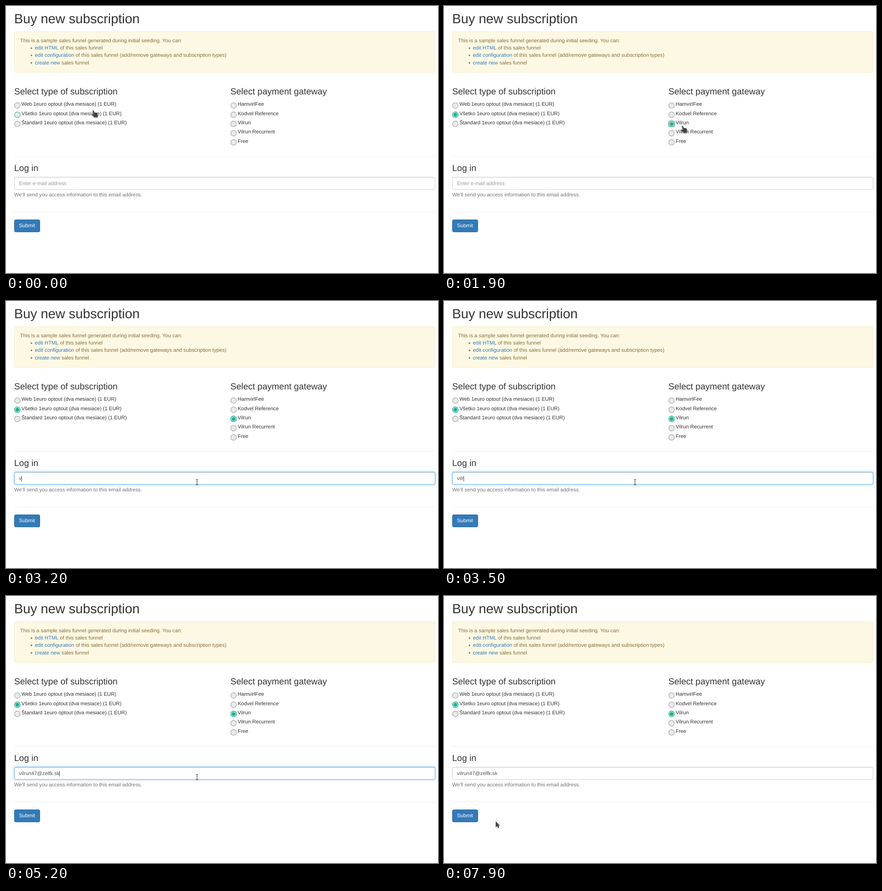
Recreate the animation shown at these times as an HTML page. Size 951x589 px, loop 8000 ms.

```html
<!DOCTYPE html>
<html lang="en">
<head>
<meta charset="utf-8">
<title>Buy new subscription</title>
<style>
html, body { margin: 0; width: 100%; height: 100%; overflow: hidden; background: #fff; }
.box { position: absolute; left: 18px; width: 927px; box-sizing: border-box; border: 1px solid; border-radius: 3.25px; }
.alert { top: 56px; height: 91px; background: #fcf8e3; border-color: #faebcc; }
.field { top: 377px; height: 28px; border-color: #ccc; box-shadow: inset 0 1px 1px rgba(0,0,0,.075); }
.glow { border-color: #66afe9; box-shadow: inset 0 1px 1px rgba(0,0,0,.075), 0 0 6.5px rgba(102,175,233,.6); }
svg { position: absolute; left: 0; top: 0; }
text { font: 11.375px "Liberation Sans", Arial, sans-serif; fill: #333; text-rendering: geometricPrecision; white-space: pre; }
.h1 { font-size: 29.25px; }
.h2 { font-size: 19.5px; }
.note, .note circle { fill: #8a6d3b; }
.link { fill: #337ab7; }
.rule { fill: #eee; }
.ring { fill: #eaeaea; stroke: #aaa; stroke-width: 1.3; }
.teal { fill: none; stroke: #6ccdb9; stroke-width: 1.3; }
.on .ring { fill: #eef3f1; stroke: #1ab394; }
.dot { fill: #1ab394; }
.dots { fill: none; stroke: #333; stroke-dasharray: 1 1; }
.btn { fill: #337ab7; stroke: #2e6da4; }
.dark { fill: #286090; stroke: #204d74; }
.pointer { fill: #434343; stroke: #fff; stroke-width: .8; stroke-linejoin: round; paint-order: stroke; filter: drop-shadow(.5px 1px .8px rgba(0,0,0,.35)); }
.beam { fill: none; stroke: #222; }

/* every state holds until its next stop; 1.25% is 100 ms */
.anim { animation: 8s step-end infinite; }
#cursor { animation-name: move; }
.hand { animation-name: hand; }
.arrow { animation-name: arrow; }
.beam { animation-name: beam; }
.glow { animation-name: glow; }
.caret { animation-name: caret; }
.dark { animation-name: press; }
.planHover { animation-name: planHover; }
.planOn { animation-name: planOn; }
.planFocus { animation-name: planFocus; }
.payHover { animation-name: payHover; }
.payOn { animation-name: payOn; }
.payFocus { animation-name: payFocus; }
@keyframes move {
  0% { transform: translate(188px, 230px); }
  1.25% { transform: translate(176px, 233px); }
  2.5% { transform: translate(161px, 236px); }
  3.75% { transform: translate(150px, 237px); }
  12.5% { transform: translate(168px, 237px); }
  13.75% { transform: translate(198px, 238px); }
  15% { transform: translate(222px, 238px); }
  16.25% { transform: translate(268px, 240px); }
  17.5% { transform: translate(340px, 246px); }
  18.75% { transform: translate(420px, 254px); }
  20% { transform: translate(490px, 261px); }
  21.25% { transform: translate(521px, 264px); }
  25% { transform: translate(468px, 335px); }
  26.25% { transform: translate(420px, 392px); }
  30% { transform: translate(420px, 393px); }
  72.5% { transform: translate(412px, 393px); }
  73.75% { transform: translate(382px, 412px); }
  75% { transform: translate(322px, 436px); }
  76.25% { transform: translate(250px, 462px); }
  77.5% { transform: translate(180px, 482px); }
  78.75% { transform: translate(118px, 491px); }
  80% { transform: translate(64px, 488px); }
  81.25% { transform: translate(50px, 485px); }
  82.5% { transform: translate(44px, 483px); }
  91.25% { transform: translate(88px, 490px); }
  92.5% { transform: translate(130px, 495px); }
  93.75% { transform: translate(158px, 497px); }
  95% { transform: translate(171px, 497px); }
  98.75%, 100% { transform: translate(114px, 497px); }
}
@keyframes hand { 0%, 80% { opacity: 1 } 25%, 91.25%, 100% { opacity: 0 } }
@keyframes arrow { 0%, 26.25%, 80% { opacity: 0 } 25%, 73.75%, 91.25%, 100% { opacity: 1 } }
@keyframes beam { 0%, 73.75%, 100% { opacity: 0 } 26.25% { opacity: 1 } }
@keyframes glow { 0%, 90%, 100% { opacity: 0 } 35% { opacity: 1 } }
@keyframes caret { 0%, 72.5%, 100% { opacity: 0 } 35% { opacity: 1 } }
@keyframes press { 0%, 91.25%, 100% { opacity: 0 } 80% { opacity: 1 } }
@keyframes planHover { 0% { opacity: 1 } 16.25%, 100% { opacity: 0 } }
@keyframes planOn { 0% { opacity: 0 } 11.25%, 100% { opacity: 1 } }
@keyframes planFocus { 0%, 23.75%, 100% { opacity: 0 } 11.25% { opacity: 1 } }
@keyframes payHover { 0%, 25%, 100% { opacity: 0 } 21.25% { opacity: 1 } }
@keyframes payOn { 0% { opacity: 0 } 23.75%, 100% { opacity: 1 } }
@keyframes payFocus { 0%, 35%, 100% { opacity: 0 } 23.75% { opacity: 1 } }
</style>
</head>
<body>
<div class="box alert"></div>
<div class="box field"></div>
<div class="box field glow anim"></div>
<svg width="951" height="589" viewBox="0 0 951 589">
  <text class="h1" x="18" y="38">Buy new subscription</text>
  <g class="note">
    <text class="note" x="31" y="80">This is a sample sales funnel generated during initial seeding. You can:</text>
    <circle cx="56" cy="93" r="1.7"/>
    <circle cx="56" cy="109" r="1.7"/>
    <circle cx="56" cy="125.5" r="1.7"/>
    <text class="note" x="63.5" y="96"><tspan class="link">edit HTML</tspan> of this sales funnel</text>
    <text class="note" x="63.5" y="112"><tspan class="link">edit configuration</tspan> of this sales funnel (add/remove gateways and subscription types)</text>
    <text class="note" x="63.5" y="129"><tspan class="link">create new</tspan> sales funnel</text>
  </g>
  <text class="h2" x="18" y="195">Select type of subscription</text>
  <text class="h2" x="494" y="195">Select payment gateway</text>
  <g id="options"></g>
  <rect class="rule" x="18" y="331" width="927" height="1"/>
  <text class="h2" x="18" y="364">Log in</text>
  <text id="hint" x="28.5" y="395" style="fill:#999">Enter e-mail address</text>
  <text id="typed" x="28.5" y="395" style="fill:#555"></text>
  <rect id="caret" class="caret anim" x="28" y="386" width="1" height="12" fill="#444"/>
  <text x="18" y="420" style="fill:#737373">We'll send you access information to this email address.</text>
  <rect class="rule" x="18" y="454" width="927" height="1"/>
  <rect class="btn" x="18.5" y="471.5" width="56" height="27" rx="3"/>
  <rect class="dark anim" x="18.5" y="471.5" width="56" height="27" rx="3"/>
  <text x="28.5" y="488" style="fill:#fff">Submit</text>
  <g id="cursor" class="anim">
    <path class="pointer hand anim" d="M2.6 1.2Q3.8-.4 5.2 1L7 5.6 9 5Q10 4.8 10.6 5.6L12 5.6Q13 5.8 13.3 7L14.4 11 14 15.4H6.4L1 10.2Q.2 8.8 1.6 8.4L4.6 9Z"/>
    <path class="pointer arrow anim" d="M0 0V13L3 10.6 5.2 14.8 7.4 13.6 5.6 9.6H9Z"/>
    <path class="beam anim" d="M-2 .5H0M1 .5H3M.5 1V12M-2 12.5H0M1 12.5H3"/>
  </g>
</svg>
<script>
const $ = id => document.getElementById(id);
const plans = ["Web", "Všetko", "Štandard"].map(name => name + " 1euro optout (dva mesiace) (1 EUR)");
const gateways = ["HamvirlFee", "Kodvel Reference", "Vilrun", "Vilrun Recurrent", "Free"];

function radio(x, y, key) {
  const ring = `<circle class="ring" cx="${x}" cy="${y}" r="6.2"/>`;
  if (!key) return ring;
  return ring +
    `<g class="on anim ${key}On">${ring}<circle class="dot" cx="${x}" cy="${y}" r="4.3"/></g>` +
    `<circle class="teal anim ${key}Hover" cx="${x}" cy="${y}" r="6.2"/>` +
    `<rect class="dots anim ${key}Focus" x="${x - 6.5}" y="${Math.round(y) - 6.5}" width="13" height="13"/>`;
}

function group(labels, left, chosen, key) {
  return labels.map((label, i) => {
    const drop = i * 20.35;
    return radio(left + 7, 219.5 + drop, i === chosen && key) +
      `<text x="${left + 16}" y="${Math.round(220.4 + drop)}">${label}</text>`;
  }).join("");
}

$("options").innerHTML = group(plans, 18, 1, "plan") + group(gateways, 494, 2, "pay");

// [time in ms, characters typed]
const email = "vilrun47@zelfk.sk";
const keys = [[0, 0], [3200, 1], [3300, 2], [3400, 3], [3500, 4], [3600, 5], [3700, 6], [4000, 8],
  [4400, 9], [4600, 10], [4700, 11], [4800, 13], [5000, 14], [5100, 15], [5200, 17]];
let start, shown = -1;

function tick(now) {
  start ??= now;
  const t = (now - start) % 8000;
  const count = keys.findLast(([at]) => at <= t)[1];
  if (count !== shown) {
    shown = count;
    $("typed").textContent = email.slice(0, count);
    $("hint").style.opacity = count ? 0 : 1;
    $("caret").setAttribute("x", Math.round(28.2 + (count ? $("typed").getComputedTextLength() : 0)));
  }
  requestAnimationFrame(tick);
}
requestAnimationFrame(tick);
</script>
</body>
</html>
```
